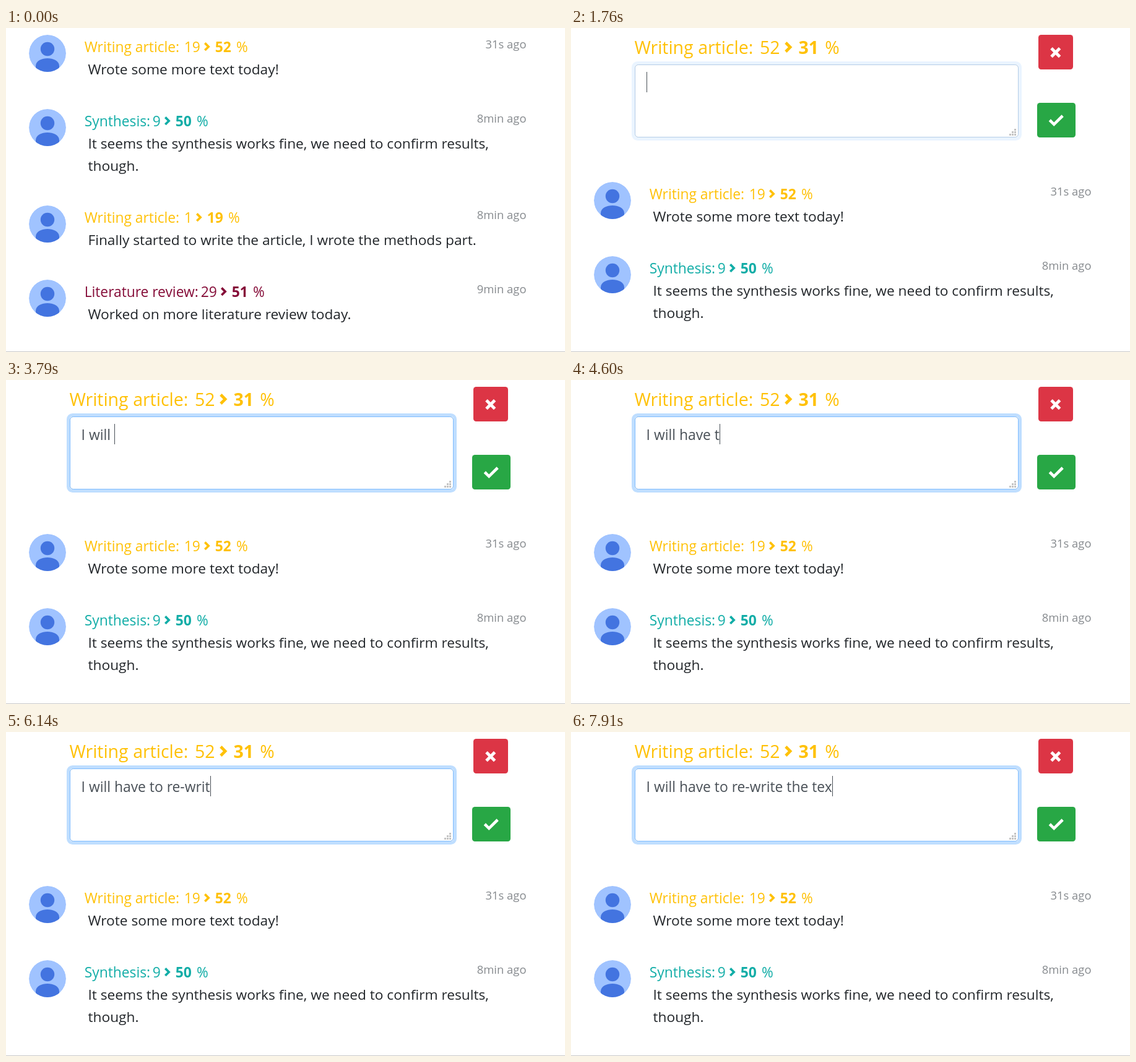
Write an HTML page that moves like this. It is 903 px wide and 524 px high and loops after 8 s.

```html
<!DOCTYPE html>
<html lang="en">
<head>
<meta charset="utf-8">
<title>Progress notes</title>
<style>
html, body { margin: 0; width: 100%; height: 100%; overflow: hidden; background: #fff; }
svg { display: block; width: 903px; height: 524px; }
text { font-family: "Open Sans", "Noto Sans", sans-serif; white-space: pre; }
.title { font-size: 22.8px; }
.title .new { font-weight: 700; }
.note { font-size: 22.7px; fill: #212529; }
.time { font-size: 18.4px; fill: #868a8e; }
.time, .old { text-anchor: end; }
.draft { font-size: 22.85px; fill: #495057; }
.line { fill: none; }
</style>
</head>
<body>
<svg viewBox="0 0 903 524">
  <defs>
    <clipPath id="disc"><circle cx="67" cy="41" r="30"/></clipPath>
    <g id="avatar" clip-path="url(#disc)">
      <circle cx="67" cy="41" r="30" fill="#a0c3ff"/>
      <circle cx="67" cy="34" r="11.2" fill="#4374e0"/>
      <path d="M48 61.5C48 53 58 49 67 49S86 53 86 61.5V72H48Z" fill="#4374e0"/>
    </g>
  </defs>
  <g id="list"></g>
  <g id="editor" visibility="hidden">
    <g id="heading" transform="translate(102.4 42) scale(1.25)"></g>
    <g id="focus" class="line">
      <rect x="100.5" y="56.5" width="625" height="123" rx="7" stroke="#bfdeff" stroke-width="5"/>
    </g>
    <rect x="103.5" y="59.5" width="619" height="117" rx="5" fill="#fff" stroke="#ced4da"/>
    <rect id="edge" x="103.5" y="59.5" width="619" height="117" rx="5" class="line" stroke="#80bdff"/>
    <path id="grip" fill="#c3c3c3"/>
    <text id="draft" class="draft" x="121.6" y="97"></text>
    <rect id="caret" y="71" width="1" height="33" fill="#495057"/>
    <rect x="755" y="11" width="56" height="56" rx="4.5" fill="#dc3545"/>
    <path d="M776 32.8L789.6 46.4M789.6 32.8L776 46.4" class="line" stroke="#fff" stroke-width="5"/>
    <rect x="753" y="121" width="62" height="56" rx="4.5" fill="#28a745"/>
    <path d="M773.3 149L780.2 155.8L794.2 142" class="line" stroke="#fff" stroke-width="4.6"/>
  </g>
  <rect y="523" width="903" height="1" fill="#c8c8c8"/>
</svg>
<script>
const LOOP = 8000, OPEN = 1470, FOCUS = 1690, BLINK = 2430, BLINK_EVERY = 500;
const $ = id => document.getElementById(id);

// The numbers hang on the chevron, whose left edge is at x = c.
function title(label, from, to, c, color) {
  return `<g class="title" fill="${color}">
    <text>${label}:</text>
    <text class="old" x="${c - 5.8}">${from}</text>
    <path d="M${c + 1.6} -14.6l5.8 5.8l-5.8 5.8" class="line" stroke="${color}" stroke-width="3.7"/>
    <text class="new" x="${c + 18}">${to}</text>
    <text x="${c + 52.2}">%</text></g>`;
}

const YELLOW = "#ffc107", TEAL = "#12ada7", MAROON = "#850c38";
const posts = [
  ["Writing article", 19, 52, 193, YELLOW, "31s ago", "Wrote some more text today!"],
  ["Synthesis", 9, 50, 129, TEAL, "8min ago",
    "It seems the synthesis works fine, we need to confirm results,", "though."],
  ["Writing article", 1, 19, 180, YELLOW, "8min ago",
    "Finally started to write the article, I wrote the methods part."],
  ["Literature review", 29, 51, 220, MAROON, "9min ago", "Worked on more literature review today."]
];
let top_ = 0;
for (const [label, from, to, c, color, time, ...lines] of posts) {
  $("list").innerHTML += `<g transform="translate(0 ${top_})"><use href="#avatar"/>
    <g transform="translate(126.7 39)">${title(label, from, to, c, color)}</g>
    <text class="time" x="840.5" y="33">${time}</text>
    ${lines.map((s, i) => `<text class="note" x="132.5" y="${75 + 36 * i}">${s}</text>`).join("")}</g>`;
  top_ += 84 + 36 * lines.length;
}
$("heading").innerHTML = title("Writing article", 52, 31, 194, YELLOW);

let dots = "";
for (let r = 0; r < 3; r++)
  for (let k = 0; k <= r; k++) dots += `M${716 - 4 * k} ${163 + 4 * r}h3v3h-3z`;
$("grip").setAttribute("d", dots);

// Bursts of typing: text, start, ms per key
const bursts = [
  ["I ", 3100, 65], ["will ", 3230, 130], ["have ", 4020, 125], ["to ", 4600, 85],
  ["re", 4950, 100], ["-w", 5300, 180], ["rite ", 5800, 160], ["the", 6860, 105], [" tex", 7470, 146]
];
const keys = bursts.flatMap(([text, start, gap]) =>
  [...text].map((char, i) => ({ char, time: start + i * gap })));

const pen = document.createElement("canvas").getContext("2d");
pen.font = '22.85px "Open Sans", "Noto Sans", sans-serif';

// Each blink hides the caret until the next key.
function caretShown(t, lastKey) {
  if (t < BLINK) return true;
  return lastKey >= t - (t - BLINK) % BLINK_EVERY;
}

function draw(t) {
  const open = t >= OPEN;
  $("list").setAttribute("transform", `translate(0 ${open ? 238 : 0})`);
  $("editor").setAttribute("visibility", open ? "visible" : "hidden");

  const pressed = keys.filter(k => k.time <= t);
  const typed = pressed.map(k => k.char).join("");
  const lastKey = pressed.length ? pressed[pressed.length - 1].time : 0;
  // While nothing is typed the caret stays hidden after the first blink.
  $("draft").textContent = typed;
  $("caret").setAttribute("x", Math.round(121.6 + pen.measureText(typed).width));
  $("caret").setAttribute("opacity", caretShown(t, lastKey) ? 1 : 0);

  // The focus ring fades in over three steps.
  const glow = Math.max(0, Math.min(1, (Math.floor((t - FOCUS) / 100) + 1) / 3));
  $("focus").setAttribute("opacity", glow);
  $("edge").setAttribute("opacity", glow);
}

const start = performance.now();
function tick() {
  draw((performance.now() - start) % LOOP);
  requestAnimationFrame(tick);
}
tick();
</script>
</body>
</html>
```
